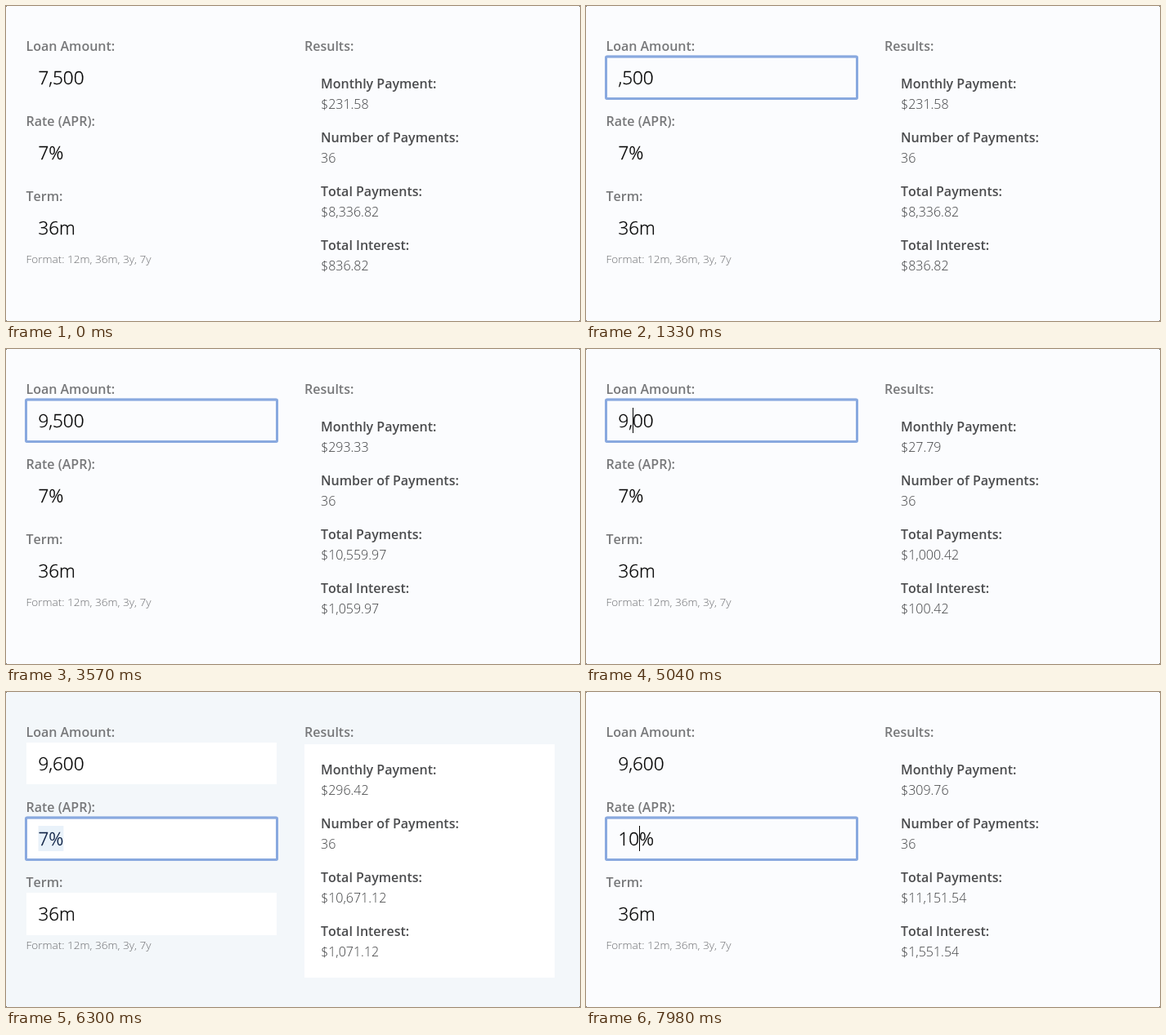
Animation of 702x386 px, one loop 8000 ms. Source, as an HTML page:

```html
<!DOCTYPE html>
<html lang="en">
<head>
<meta charset="utf-8">
<title>Loan calculator</title>
<style>
  html, body { margin: 0; width: 100%; height: 100%; overflow: hidden; }
  svg { display: block; width: 702px; height: 386px; font: 300 16px "Open Sans", sans-serif; font-kerning: none; }
  .label { font-weight: 600; fill: #77787a; }
  .head { font-weight: 600; fill: #4b4c4e; }
  .value { fill: #3f4042; }
  .hint { font-size: 13.6px; fill: #6c6d70; }
  .input { font-size: 22.4px; color: #000; fill: currentColor; stroke: currentColor; stroke-width: .3; }
  .ring { fill: none; stroke: #89a9df; stroke-width: 3; filter: drop-shadow(0 0 .7px #89a9df80); }
</style>
</head>
<body>
<svg id="stage" viewBox="0 0 702 386"></svg>
<script>
const LOOP = 8000, LAG = 90, TERM = 36, LEFT = 24.5, TEXT_X = LEFT + 15;
const stage = document.getElementById('stage');

// One entry per key press: time, amount, rate, focused field, caret index ('all' = selected)
const keys = [
  [0, '7,500', '7%', null, 0],
  [420, '7,500', '7%', 0, 'all'],
  [1050, '7,500', '7%', 0, 0],
  [1260, ',500', '7%', 0, 0],
  [1680, '9,500', '7%', 0, 1],
  [4130, '9,500', '7%', 0, 2],
  [4340, '9,500', '7%', 0, 3],
  [4830, '9,00', '7%', 0, 2],
  [5250, '9,600', '7%', 0, 3],
  [5950, '9,600', '7%', 1, 'all'],
  [6510, '9,600', '7%', 1, 0],
  [6930, '9,600', '%', 1, 0],
  [7630, '9,600', '1%', 1, 1],
  [7840, '9,600', '10%', 1, 2],
].map(([time, amount, rate, field, caret]) => ({ time, amount, rate, field, caret }));

function add(tag, attrs, content = '') {
  const el = document.createElementNS('http://www.w3.org/2000/svg', tag);
  for (const name in attrs) el.setAttribute(name, attrs[name]);
  el.textContent = content;
  return stage.appendChild(el);
}
const rect = (x, y, width, height, fill) => add('rect', { x, y, width, height, fill });
const text = (cls, x, y, content) => add('text', { class: cls, x, y }, content);
const show = (el, on) => el.setAttribute('visibility', on ? 'visible' : 'hidden');

const back = rect(0, 0, 702, 386);
const panels = [[25, 62, 306, 51], [25, 154, 306, 51], [25, 246, 306, 52], [365, 64, 306, 286]]
  .map(box => rect(...box, '#fff'));
for (const x of [0, 701]) for (const y of [0, 385]) rect(x, y, 1, 1, '#707274');

const ring = add('rect', { class: 'ring', x: LEFT, y: 62, width: 307, height: 51.5, rx: 1.5 });
const selection = rect(TEXT_X, 72, 31, 31, '#e9f2fa');
const inputs = ['Loan Amount:', 'Rate (APR):', 'Term:'].map((label, i) => {
  text('label', LEFT, 55 + 92 * i, label);
  return text('input', TEXT_X, 96 + 92 * i, '36m');
});
const caret = rect(0, 0, 1, 31, '#000');
text('hint', LEFT, 315, 'Format: 12m, 36m, 3y, 7y');

text('label', 365, 55, 'Results:');
const heads = ['Monthly Payment:', 'Number of Payments:', 'Total Payments:', 'Total Interest:']
  .map((head, i) => text('head', 385, 101 + 66 * i, head));
const values = heads.map((_, i) => text('value', 385, 126 + 66 * i, ''));
const message = text('value', 385, 101, 'Please fill in all fields.');

const stateAt = t => keys.findLast(key => key.time <= t) || keys[0];
const money = n => '$' + n.toLocaleString('en-US', { minimumFractionDigits: 2, maximumFractionDigits: 2 });

function showResults({ amount, rate }) {
  const loan = +amount.replace(',', '');
  const monthly = parseFloat(rate) / 1200;
  const valid = monthly > 0;
  [...heads, ...values].forEach(el => show(el, valid));
  show(message, !valid);
  if (!valid) return;
  const payment = loan * monthly / (1 - (1 + monthly) ** -TERM);
  const total = payment * TERM;
  [money(payment), TERM, money(total), money(total - loan)]
    .forEach((value, i) => values[i].textContent = value);
}

function render(t) {
  const state = stateAt(t);
  const focused = state.field !== null;
  const selected = state.caret === 'all';
  const input = inputs[state.field || 0];
  const top = 92 * (state.field || 0);

  inputs[0].textContent = state.amount;
  inputs[1].textContent = state.rate;
  inputs.forEach(el => el.style.color = selected && el === input ? '#081c40' : '');

  back.setAttribute('fill', selected ? '#f3f7fa' : '#fbfcfe');
  panels.forEach(panel => show(panel, selected));
  show(ring, focused);
  ring.setAttribute('y', 62 + top);
  show(selection, selected);
  selection.setAttribute('y', 72 + top);
  selection.setAttribute('width', input.getComputedTextLength());

  const blinkOn = (t - state.time) % 1000 < 500;
  show(caret, state.caret > 0 && blinkOn);
  if (state.caret > 0) {
    caret.setAttribute('x', Math.round(TEXT_X + input.getSubStringLength(0, state.caret)));
    caret.setAttribute('y', 72 + top);
  }
  showResults(stateAt(t - LAG));
}

const start = performance.now();
function tick() {
  render((performance.now() - start) % LOOP);
  requestAnimationFrame(tick);
}
tick();
</script>
</body>
</html>
```
